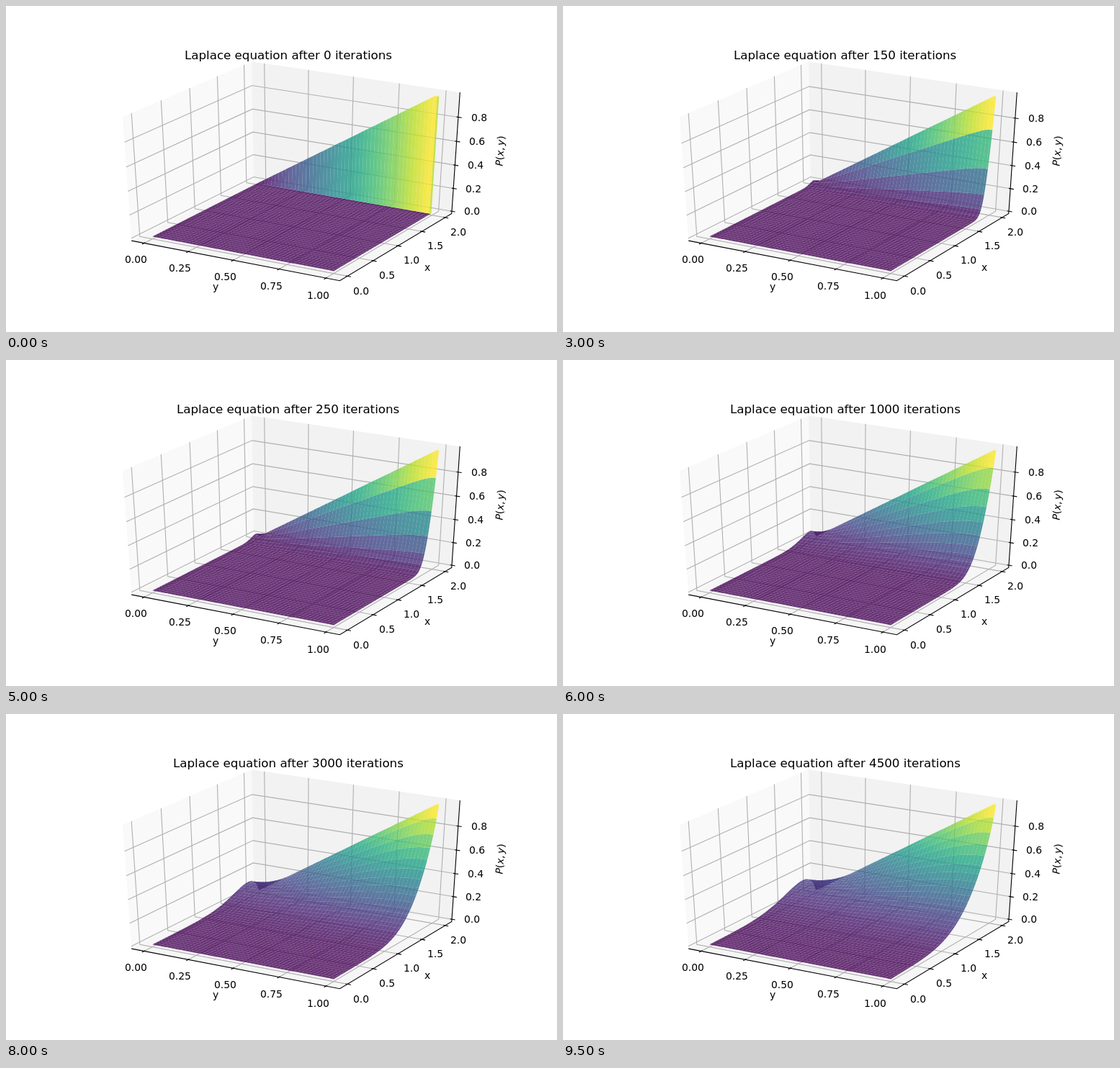
These frames come from a looping animation (765x453 px, 10000 ms). An HTML page with a canvas:

```html
<!DOCTYPE html>
<html lang="en">
<head>
<meta charset="utf-8">
<title>Laplace equation</title>
<style>
html, body { margin: 0; width: 100%; height: 100%; overflow: hidden; background: #fff; }
canvas { display: block; }
</style>
</head>
<body>
<canvas id="stage" width="765" height="453"></canvas>
<script>
const ctx = document.getElementById('stage').getContext('2d');
const NX = 120, NY = 100, STEP_X = 3, STEP_Y = 2;
const FRAME = 500, COUNT = 20, SMALL = 13.89, FAMILY = '"DejaVu Sans", sans-serif';
const E = 0.5 + 1 / 48;          // half size of the box
const PAD = 0.06785, FAR = 0.1475; // distance of tick labels and axis labels
const VIRIDIS = ['440154', '482475', '414487', '355f8d', '2a788e', '21918c',
  '22a884', '44bf70', '7ad151', 'bddf26', 'fde725']
  .map(h => [0, 2, 4].map(i => parseInt(h.slice(i, i + 2), 16)));

// Camera at azimuth -60, elevation 30, distance 10; the box is a unit cube around 0.
const S = Math.sqrt(3) / 2;
const depth = (a, b, c) => 10 - (S / 2 * a - 0.75 * b + 0.5 * c);
function project(a, b, c) {
  const w = depth(a, b, c);
  return [95.625 + ((S * a + 0.5 * b) / w + 0.095) * 3204.73,
    403.17 - ((-0.25 * a + S / 2 * b + S * c) / w + 0.095) * 1885.46];
}
const unitY = y => (y + 0.05) / 1.1 - 0.5;
const unitX = x => (x + 0.1) / 2.2 - 0.5;

// Relaxation with p = 0 at x = 0, p = y at x = 2 and no slope across the other sides
const iterations = i => i < 11 ? 25 * i : 500 * (i - 10);

function solve() {
  const dx2 = (2 / (NX - 1)) ** 2, dy2 = (1 / (NY - 1)) ** 2;
  const cx = dy2 / (2 * (dx2 + dy2)), cy = dx2 / (2 * (dx2 + dy2));
  let p = new Float64Array(NX * NY);
  const wall = top => {
    for (let j = 0; j < NY; j++) p[j * NX + NX - 1] = Math.min(j, top) / (NY - 1);
  };
  wall(NY - 3);
  const states = [p.slice()];
  wall(NY - 2);
  let q = p.slice(), done = 0;
  for (let k = 1; k < COUNT; k++) {
    for (; done < iterations(k); done++) {
      for (let j = 1; j < NY - 1; j++) {
        for (let i = 1; i < NX - 1; i++) {
          const n = j * NX + i;
          q[n] = cx * (p[n - 1] + p[n + 1]) + cy * (p[n - NX] + p[n + NX]);
        }
      }
      q.copyWithin(0, NX, 2 * NX);
      q.copyWithin((NY - 1) * NX, (NY - 2) * NX, (NY - 1) * NX);
      [p, q] = [q, p];
    }
    states.push(p.slice());
  }
  return states;
}

function cuts(n, step) {
  const list = [];
  for (let i = 0; i < n - 1; i += step) list.push(i);
  return [...list, n - 1];
}

// Grid points around one patch
function rim(i0, i1, j0, j1) {
  const pts = [];
  for (let i = i0; i < i1; i++) pts.push([i, j0]);
  for (let j = j0; j < j1; j++) pts.push([i1, j]);
  for (let i = i1; i > i0; i--) pts.push([i, j1]);
  for (let j = j1; j > j0; j--) pts.push([i0, j]);
  return pts;
}

const rims = [];
const xs = cuts(NX, STEP_X), ys = cuts(NY, STEP_Y);
for (let j = 0; j < ys.length - 1; j++)
  for (let i = 0; i < xs.length - 1; i++)
    rims.push(rim(xs[i], xs[i + 1], ys[j], ys[j + 1]));

function trace(pts) {
  ctx.beginPath();
  pts.forEach(([x, y], i) => i ? ctx.lineTo(x, y) : ctx.moveTo(x, y));
}
function pane(color, ...corners) {
  trace(corners.map(c => project(...c)));
  ctx.closePath();
  ctx.fillStyle = color;
  ctx.fill();
}
function line(color, ...points) {
  trace(points.map(c => project(...c)));
  ctx.strokeStyle = color;
  ctx.lineWidth = 1.11;
  ctx.stroke();
}
function label(text, [x, y], drop, size = SMALL) {
  ctx.font = `${size}px ${FAMILY}`;
  ctx.fillText(text, Math.round(x - ctx.measureText(text).width / 2), Math.round(y + drop));
}

function drawAxes(top) {
  pane('#f8f9f8', [-E, -E, -E], [-E, E, -E], [-E, E, E], [-E, -E, E]);
  pane('#f1f2f1', [-E, E, -E], [E, E, -E], [E, E, E], [-E, E, E]);
  pane('#f5f6f5', [-E, -E, -E], [E, -E, -E], [E, E, -E], [-E, E, -E]);

  const grid = '#b0b0b0', out = E + 1 / 60, inn = E - 1 / 120;
  const yTicks = [0, 0.25, 0.5, 0.75, 1].map(v => [unitY(v), v.toFixed(2)]);
  const xTicks = [0, 0.5, 1, 1.5, 2].map(v => [unitX(v), v.toFixed(1)]);
  const zTicks = [0, 0.2, 0.4, 0.6, 0.8].map(v => [v / top - 0.5, v.toFixed(1)]);
  for (const [u] of yTicks) line(grid, [u, -E, -E], [u, E, -E], [u, E, E]);
  for (const [u] of xTicks) line(grid, [E, u, -E], [-E, u, -E], [-E, u, E]);
  for (const [u] of zTicks) line(grid, [-E, -E, u], [-E, E, u], [E, E, u]);

  line('#000', [-E, -E, -E], [E, -E, -E], [E, E, -E], [E, E, E]);
  ctx.fillStyle = '#000';
  const d = E + PAD;
  for (const [u, text] of yTicks) {
    line('#000', [u, -out, -E], [u, -inn, -E]);
    label(text, project(u, -d, -d), 11);
  }
  for (const [u, text] of xTicks) {
    line('#000', [out, u, -E], [inn, u, -E]);
    label(text, project(d, u, -d), 11);
  }
  for (const [u, text] of zTicks) {
    line('#000', [out, E, u], [inn, E, u]);
    label(text, project(d, d, u), 7.5);
  }
  const f = E + FAR;
  label('y', project(0, -f, -f), 4);
  label('x', project(f, 0, -f), 4);
  drawHeightLabel(project(f, f, 0));
}

function drawHeightLabel([x, y]) {
  const parts = [['P', 1], ['(', 0], ['x', 1], [',', 0, 2.3], ['y', 1], [')', 0]];
  const setFont = italic => ctx.font = `${italic ? 'italic ' : ''}${SMALL}px ${FAMILY}`;
  const widths = parts.map(([text, italic, gap = 0]) => {
    setFont(italic);
    return ctx.measureText(text).width + gap;
  });
  ctx.save();
  ctx.translate(x, y);
  ctx.rotate(-86.3 * Math.PI / 180);
  let at = -widths.reduce((a, b) => a + b) / 2;
  parts.forEach(([text, italic], i) => {
    setFont(italic);
    ctx.fillText(text, at, 4.3);
    at += widths[i];
  });
  ctx.restore();
}

function viridis(t) {
  const s = Math.min(Math.max(t, 0), 1) * 10, i = Math.min(Math.floor(s), 9);
  const mix = VIRIDIS[i].map((c, k) => Math.round(c + (VIRIDIS[i + 1][k] - c) * (s - i)));
  return `rgba(${mix},0.8)`;
}

function drawSurface(p, top) {
  const faces = rims.map(pts => {
    let sum = 0, dist = 0;
    const shape = pts.map(([i, j]) => {
      const z = p[j * NX + i];
      const pos = [unitY(j / (NY - 1)), unitX(2 * i / (NX - 1)), z / top - 0.5];
      sum += z;
      dist += depth(...pos);
      return project(...pos);
    });
    return { shape, mean: sum / pts.length, dist: dist / pts.length };
  });
  const max = Math.max(...faces.map(f => f.mean)), min = Math.min(...faces.map(f => f.mean));
  faces.sort((a, b) => b.dist - a.dist);
  for (const f of faces) {
    trace(f.shape);
    ctx.closePath();
    ctx.fillStyle = viridis((f.mean - min) / (max - min));
    ctx.fill();
  }
}

const states = solve();
let shown = -1;

function draw(now) {
  const k = Math.floor(now / FRAME) % COUNT;
  if (k !== shown) {
    shown = k;
    const top = states[k].reduce((a, b) => Math.max(a, b));
    ctx.fillStyle = '#fff';
    ctx.fillRect(0, 0, 765, 453);
    drawAxes(top);
    drawSurface(states[k], top);
    ctx.fillStyle = '#000';
    label(`Laplace equation after ${iterations(k)} iterations`, [392.06, 74], 0, 16.67);
  }
  requestAnimationFrame(() => draw(performance.now() - start));
}

const start = performance.now();
draw(0);
</script>
</body>
</html>
```
